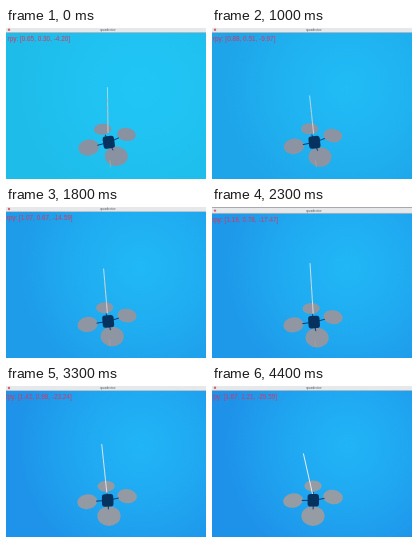
An HTML page that plays this animation: 200 by 151 pixels, repeating every 4.5 s.

```html
<!DOCTYPE html>
<html lang="en">
<head>
<meta charset="utf-8">
<style>
html, body { margin: 0; width: 100%; height: 100%; overflow: hidden; background: #1d97e6; }
svg { display: block; width: 100vw; height: 100vh; }
text { font-family: "Liberation Sans", Arial, sans-serif; }
</style>
</head>
<body>
<svg viewBox="0 0 200 151" preserveAspectRatio="none">
  <defs>
    <radialGradient id="glow" gradientUnits="userSpaceOnUse" cx="135" cy="60" r="125">
      <stop offset="0" stop-color="#22ccff" stop-opacity=".6"/>
      <stop offset=".5" stop-color="#22ccff" stop-opacity=".36"/>
      <stop offset="1" stop-color="#22ccff" stop-opacity="0"/>
    </radialGradient>
  </defs>
  <rect id="sky" width="200" height="151"/>
  <rect width="200" height="151" fill="url(#glow)"/>
  <g id="bar">
    <rect y="-12" width="200" height="12" fill="#42464c"/>
    <rect y="-6" width="200" height="6" fill="#e6e8ea"/>
    <rect y="-.5" width="200" height=".6" fill="#a9bccb"/>
    <circle cx="3" cy="-2.8" r="1.2" fill="#d8606a"/>
    <text x="102" y="-1.4" font-size="3.6" text-anchor="middle" fill="#555b63">quadrotor</text>
  </g>
  <text id="readout" font-size="6.4" fill="#dc3460"></text>
  <g id="discs"><ellipse/><ellipse/><ellipse/><ellipse/></g>
  <g id="arms" stroke="#0b3a78" stroke-linecap="round"><line/><line/><line/><line/></g>
  <line id="tail" stroke="#d8a888" stroke-width=".7"/>
  <rect id="hub" x="-5.7" y="-6.2" width="11.4" height="12.4" rx="2.8" fill="#05325f"/>
  <line id="beam" stroke="#e9eef0"/>
  <line id="tint" stroke="#d9a78c" stroke-width=".7" stroke-dasharray="4 3"/>
</svg>
<script>
const LOOP = 4500, STEP = 100, LAST = LOOP - STEP;
const $ = id => document.getElementById(id);
const set = (el, attrs) => { for (const k in attrs) el.setAttribute(k, attrs[k]); };
const mix = (a, b, u) => a + (b - a) * u;
const line = (el, x1, y1, x2, y2, more) => set(el, { x1, y1, x2, y2, ...more });

// Place a rotor on a tilted circle seen in perspective.
function rotor(angle, cx, cy) {
  const x = Math.sin(angle), z = Math.cos(angle);
  const s = 1 / (1 - 0.147 * z);
  return {
    cx: cx + 20 * x * s,
    cy: cy + 14.7 * z * s - 1.75 * x,
    rx: 9.9 * s,
    ry: 7.2 * s * s,
    tilt: 8 * x
  };
}

function draw(t) {
  const u = t / LAST;
  const bob = Math.exp(-(((t - 2550) / 500) ** 2));
  const sway = Math.cos(2 * Math.PI * (t - 1000) / 3400);
  const yaw = 19.6 * (1 - u) ** 1.15;
  const cx = mix(102.5, 101, u), cy = 112.8 + 1.5 * bob;
  const hx = cx + 0.3, hy = 114.3 + bob;

  set($("sky"), { fill: `rgb(30 ${144 + 44 * Math.exp(-t / 1300)} 233)` });
  set($("bar"), { transform: `translate(0 ${4.6 + 2.3 * bob})` });

  const angles = [mix(.65, 1.67, u), mix(.3, 1.21, u), mix(-4.2, -29.59, u)];
  set($("readout"), { x: 1.5 - 2.5 * u, y: 12.6 + 2.6 * bob });
  $("readout").textContent = `rpy: [${angles.map(n => n.toFixed(2)).join(", ")}]`;

  set($("discs"), { fill: `rgb(${mix(137, 150, u)} ${mix(146, 156, u)} 163)` });
  [...$("discs").children].forEach((disc, i) => {
    const { tilt, ...shape } = rotor((yaw + 90 * i) * Math.PI / 180, cx, cy);
    set(disc, { ...shape, transform: `rotate(${tilt} ${shape.cx} ${shape.cy})` });
    line($("arms").children[i], hx, hy, mix(hx, shape.cx, .55), mix(hy, shape.cy, .55));
  });
  set($("hub"), { transform: `translate(${hx} ${hy}) rotate(${-8 * (1 - u)})` });
  line($("tail"), hx + 1, hy + 18, hx + 2, hy + 25, { opacity: .8 * (1 - u) });

  const topX = mix(101, 93, u) - 1.6 * sway, topY = 61 + 6.5 * sway;
  const endX = mix(102, 100.5, u), endY = mix(105, 108, u);
  line($("beam"), topX, topY, endX, endY, { "stroke-width": mix(.6, 1, u) });
  line($("tint"), mix(topX, endX, .25), mix(topY, endY, .25), endX, endY, { opacity: 1 - u });
}

const start = performance.now();
function tick() {
  const t = (performance.now() - start) % LOOP;
  draw(Math.floor(t / STEP) * STEP);
  requestAnimationFrame(tick);
}
tick();
</script>
</body>
</html>
```
